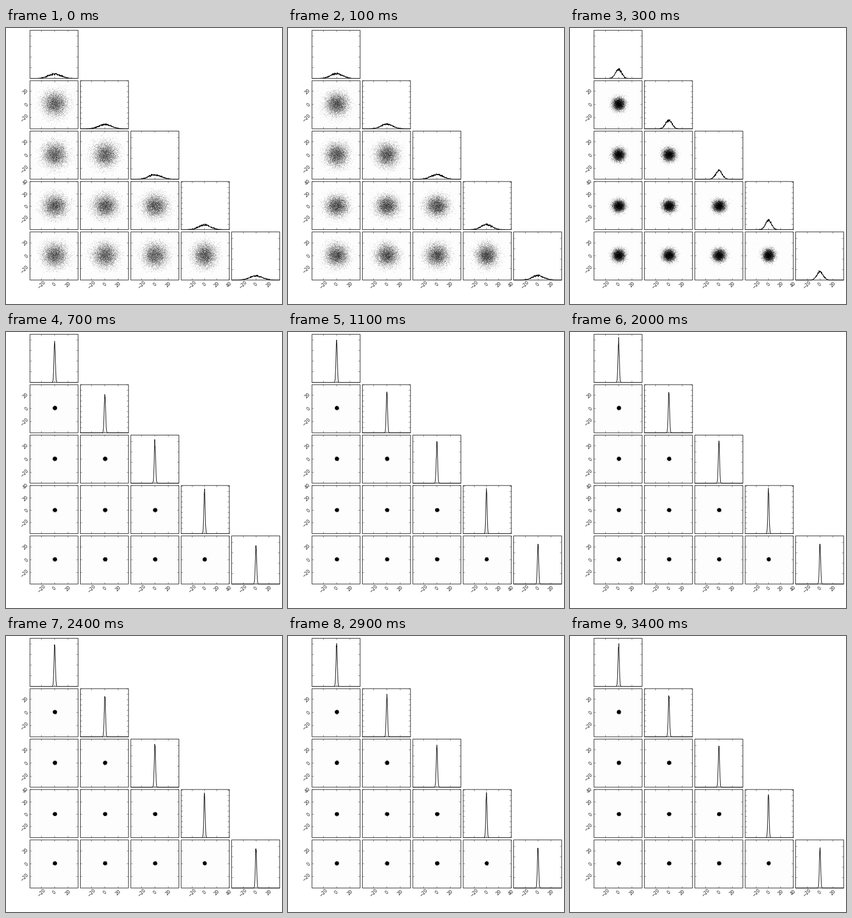
These frames come from a looping animation (518 by 518 pixels, 3500 ms). A matplotlib script:

```python
import numpy as np
import matplotlib.pyplot as plt
from matplotlib.animation import FuncAnimation
from matplotlib.patches import Rectangle

SIDE, DPI = 518, 74
PX = 72 / DPI                     # points per pixel
FRAMES, STEP_MS = 35, 100
DIMS, WALKERS, BINS = 5, 6000, 260
LEFT, TOP, PITCH, SIZE = 45, 4.3, 94.6, 90.3

ZERO = [46.3, 46.0, 45.3, 43.7, 45.8]      # where 0 falls inside a panel
UNIT = [1.24, 1.24, 1.25, 1.16, 1.20]      # pixels per data unit
PEAK = [79, 77, 78, 83, 75]                # settled histogram heights
COUNT_TICK = [19.9, 10, 19.6, 9.9, 19.5]   # spacing of the count ticks
INK = "#1c1c1c"

plt.rcParams["font.family"] = "DejaVu Sans"
fig = plt.figure(figsize=(SIDE / DPI, SIDE / DPI), dpi=DPI, facecolor="white")
ax = fig.add_axes([0, 0, 1, 1])
ax.set(xlim=(0, SIDE), ylim=(SIDE, 0))
ax.axis("off")


def left(col):
    return LEFT + PITCH * col


def bottom(row):
    return TOP + PITCH * row + SIZE


def tick_values(dim):
    return (-20, 0, 20, 40) if dim == 3 else (-20, 0, 20)


def offset(dim, value):
    return ZERO[dim] + UNIT[dim] * value


def stroke(xs, ys):
    ax.plot(xs, ys, color=INK, lw=0.5 * PX, zorder=3, snap=False)


def ticks(row, col):
    x0, y0, n = left(col), bottom(row), 3
    for value in tick_values(col):
        x = x0 + offset(col, value)
        stroke([x, x], [y0, y0 - n])
        stroke([x, x], [y0 - SIZE, y0 - SIZE + n])
    if row == col:
        heights = np.arange(COUNT_TICK[row], SIZE, COUNT_TICK[row])
    else:
        heights = [offset(row, v) for v in tick_values(row)]
    for h in heights:
        stroke([x0, x0 + n], [y0 - h, y0 - h])
        stroke([x0 + SIZE, x0 + SIZE - n], [y0 - h, y0 - h])


def label(x, y, value):
    ax.text(x, y, str(value).replace("-", "\u2212"), fontsize=8.2 * PX,
            color=INK, rotation=45, ha="center", va="center")


def panel(row, col):
    face = "white" if row == col else "#fdfdfd"
    corner = (left(col), bottom(row) - SIZE)
    ax.add_patch(Rectangle(corner, SIZE, SIZE, fc=face, ec="none", zorder=0))
    ax.add_patch(Rectangle(corner, SIZE, SIZE, fc="none", ec=INK, lw=PX,
                           snap=False, zorder=4))
    ticks(row, col)


clouds, curves = {}, []
for row in range(DIMS):
    for col in range(row + 1):
        panel(row, col)
        if col < row:
            clouds[row, col], = ax.plot([], [], ",", color="black",
                                        alpha=0.13, zorder=2)
    curves.append(ax.plot([], [], color="black", lw=PX, snap=False,
                          zorder=2)[0])

for dim in range(DIMS):
    for v in tick_values(dim):
        wide, minus = v != 0, v < 0
        label(left(dim) + offset(dim, v) - 0.3, 481.3 + minus, v)
        if dim:
            label(38.8 - 2.5 * wide - 1.5 * minus,
                  bottom(dim) - offset(dim, v) + 0.8 + 0.8 * minus, v)


def spread(i):
    """Walkers start wide and collapse onto a unit Gaussian."""
    return np.hypot(1, 9.5 * np.exp(-0.7 * (i / 3) ** 1.9))


def update(i):
    rng = np.random.default_rng(100 + i)
    data = spread(i) * rng.standard_normal((DIMS, WALKERS))
    pos = np.array([offset(d, data[d]) for d in range(DIMS)])
    inside = (pos > 1) & (pos < SIZE - 1)

    for (row, col), cloud in clouds.items():
        keep = inside[row] & inside[col]
        cloud.set_data(left(col) + pos[col, keep], bottom(row) - pos[row, keep])

    for d, curve in enumerate(curves):
        counts, edges = np.histogram(pos[d], BINS, (0, SIZE))
        top = WALKERS * (SIZE / BINS) / (UNIT[d] * np.sqrt(2 * np.pi))
        height = np.minimum(counts * PEAK[d] / top, SIZE)
        curve.set_data(left(d) + (edges[:-1] + edges[1:]) / 2,
                       bottom(d) - height)
    return [*clouds.values(), *curves]


anim = FuncAnimation(fig, update, frames=FRAMES, interval=STEP_MS,
                     repeat=True, repeat_delay=0, blit=False)
plt.show()
```
